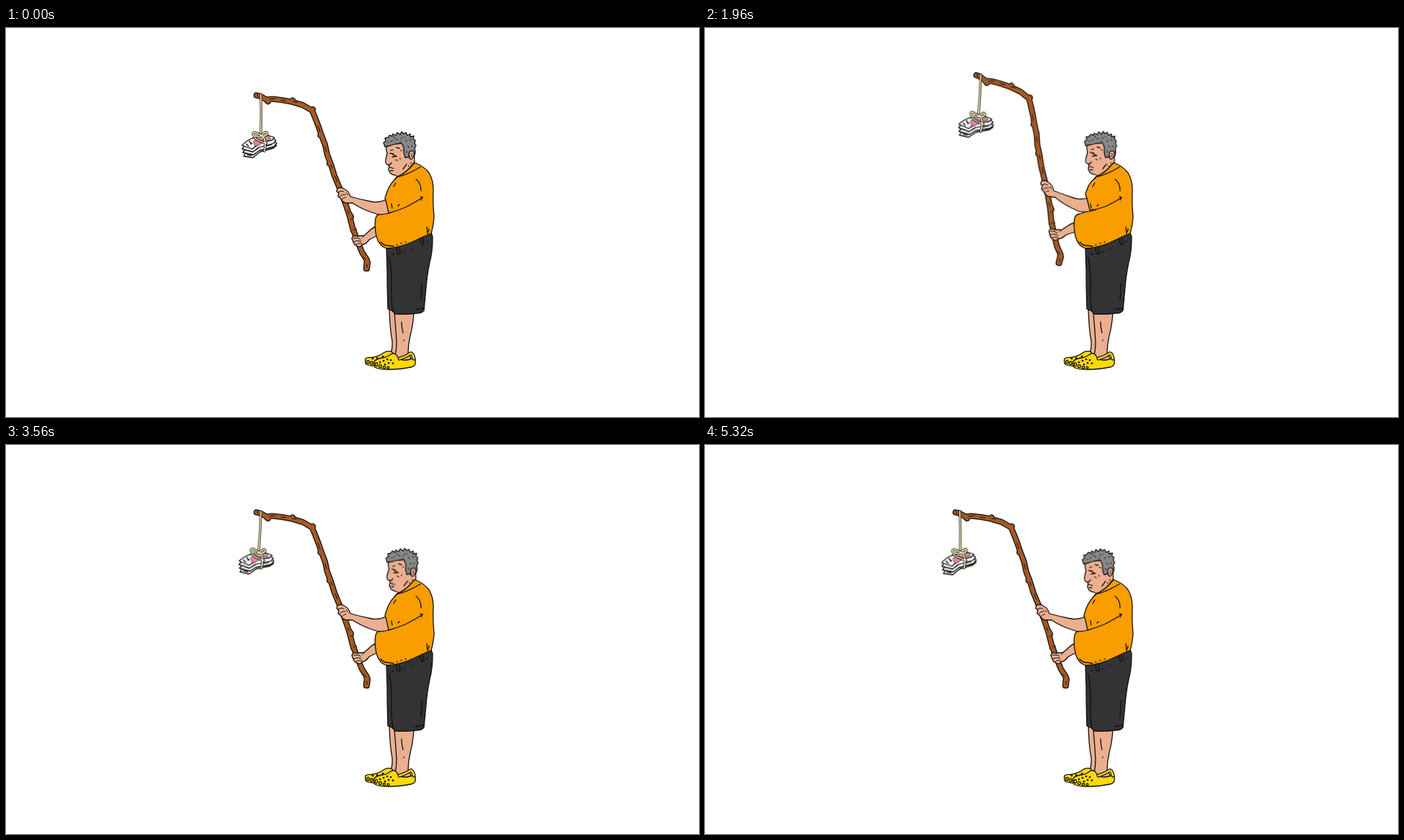
Animation, 960 px wide and 540 px high, one loop 5.48 s. Source, as an HTML page without scripts:

```html
<!DOCTYPE html>
<html lang="en">
<head>
<meta charset="utf-8">
<title>Money on a stick</title>
<style>
html, body { margin: 0; width: 100%; height: 100%; overflow: hidden; background: #fff; }
svg { display: block; width: 100vw; height: 100vh; }
path, ellipse { stroke: #111; stroke-width: 1.3; stroke-linecap: round; stroke-linejoin: round; }
.skin { fill: #ebaf90; }
.shirt { fill: #f99d00; }
.pants { fill: #333335; }
.shoe { fill: #fcd90c; }
.hair { fill: #868789; }
.note { fill: #f1f0f2; }
.pink { fill: #ee7f9f; stroke-width: .6; }
.line { fill: none; }
.fine { fill: none; stroke-width: 1; }
.bare { stroke: none; }
.holes { fill: none; stroke-width: 2.7; }
.bark { fill: none; stroke-width: 8.2; }
.wood { fill: none; stroke: #a65923; stroke-width: 5.6; }
.rope { fill: none; stroke-width: 3.3; }
.core { fill: none; stroke: #f2e8ae; stroke-width: 1.7; }
.strap { fill: none; stroke-width: 5; }
.band { fill: none; stroke: #fcd90c; stroke-width: 2.6; }

.lift, .level, .reach, .sleeve, .head, .swing, .twist { animation: 5480ms infinite ease-in-out; }
.lift { transform-origin: 545.6px 269.6px; animation-name: lift; }
.reach { transform-origin: 553px 282px; animation-name: reach; }
.level { transform-origin: 353px 92px; animation-name: level; }
.swing { transform-origin: 353px 92px; animation-name: swing; }
.twist { transform-origin: 353px 146px; animation-name: twist; }
.head { transform-origin: 560px 215px; animation-name: nod; }
.sleeve { animation-name: sleeve; }

@keyframes lift {
  0%, 56%, 100% { transform: rotate(0deg); }
  9.5%, 46.4% { transform: rotate(8.7deg); }
}
@keyframes level {
  0%, 56%, 100% { transform: rotate(0deg); }
  9.5%, 46.4% { transform: rotate(-8.7deg); }
}
@keyframes reach {
  0%, 56%, 100% { transform: rotate(0deg); }
  9.5%, 46.4% { transform: rotate(6.5deg); }
}
@keyframes sleeve {
  0%, 56%, 100% { d: path("M541 208Q532 216 528 227L525 236L528 247L530 257Q541 254 553 249Q569 241 577 235"); }
  9.5%, 46.4% { d: path("M541 208Q533 214 530 222L527 230L530 240L533 253Q543 252 554 248Q569 241 577 235"); }
}
@keyframes swing {
  0%, 100% { transform: rotate(0deg); }
  4.4% { transform: rotate(3deg); }
  12.4% { transform: rotate(-7deg); }
  19% { transform: rotate(7deg); }
  25.7% { transform: rotate(-6deg); }
  33.9% { transform: rotate(5deg); }
  40.2% { transform: rotate(-4deg); }
  45.3% { transform: rotate(2deg); }
  51.1% { transform: rotate(-5deg); }
  55.5% { transform: rotate(-6deg); }
  62% { transform: rotate(8deg); }
  68.6% { transform: rotate(-4deg); }
  75.2% { transform: rotate(4deg); }
  81.8% { transform: rotate(-2deg); }
  88.5% { transform: rotate(.8deg); }
  97% { transform: rotate(-.6deg); }
}
@keyframes twist {
  0%, 100% { transform: rotate(0deg); }
  4.4% { transform: rotate(4deg); }
  12.4% { transform: rotate(-14deg); }
  19% { transform: rotate(6deg); }
  25.7% { transform: rotate(-8deg); }
  33.9% { transform: rotate(3deg); }
  40.2% { transform: rotate(-4deg); }
  45.3% { transform: rotate(2deg); }
  55.5% { transform: rotate(-7deg); }
  62% { transform: rotate(4deg); }
  68.6% { transform: rotate(-3deg); }
  75.2% { transform: rotate(2deg); }
  81.8% { transform: rotate(-1deg); }
  97% { transform: rotate(-.5deg); }
}
@keyframes nod {
  0%, 25.5%, 56.9%, 100% { transform: rotate(0deg); }
  7.3% { transform: rotate(4.4deg); }
  12.4% { transform: rotate(2.7deg); }
  20% { transform: rotate(1.2deg); }
  35.8% { transform: rotate(2.7deg); }
  46.5% { transform: rotate(4.4deg); }
  65.7% { transform: rotate(3.5deg); }
  72.3% { transform: rotate(2.7deg); }
  78.5% { transform: rotate(3.3deg); }
  86% { transform: rotate(.8deg); }
  92% { transform: rotate(2.6deg); }
  97% { transform: rotate(-.4deg); }
}
</style>
</head>
<body>
<svg viewBox="0 0 960 540">
<defs>
  <path id="stick" d="M347 93.500L353 95L361 99.500L369 98.500L382 100L396 102.500L411 107L424 114.500L428 124L433 137L437 149L442 162L445 176L450 189L455 205L462 222L470 243L476 261L480 277L487 296L493 311L500 322L499 334M360 99L363 102M396 102L397 100.500M424 114L425 113M437 149L435.500 149M449 188L448 188M475 257L478 262M482 281L481 281M499 321L501 325L500 334" style="stroke:inherit;stroke-width:inherit"/>
  <path id="bow" d="M344 152Q349 157 361 160M356 150Q361 158 358 171M353 149Q343 142 342 147Q343 152 353 150Q360 142 362 146Q361 151 353 150" style="stroke:inherit;stroke-width:inherit"/>
</defs>

<!-- legs and clogs -->
<path class="skin" d="M531 390Q532 420 535 434Q536 445 532 454L541 457L543 395Z"/>
<path class="shoe" d="M498 459Q500 457 506 457.500Q516 456 523 451Q529 447 535 450L540 458L522 470Q507 470 499 467Q497 463 498 459Z"/>
<path class="skin" d="M538 395Q540 418 541 436Q541 447 539 454L546 463L561 463Q562 457 557 452Q557 440 560 427Q564 412 565 395Z"/>
<path class="line" d="M548 408Q548 416 550 423M551 433v1"/>
<path class="shoe" d="M510 463Q513 459 521 458Q528 457 533 453Q538 450 541 454Q544 461 552 461Q561 461 565 457Q568 460 567 466Q566 470 560 471Q546 474 530 474Q516 474 511 471Q509 467 510 463Z"/>
<path class="strap" d="M545 459Q553 457 561 451.500Q564 453 565 459"/>
<path class="band" d="M545 459Q553 457 561 451.500Q564 453 565 459"/>
<g class="line">
  <ellipse cx="501.500" cy="463.500" rx="1.7" ry="2.2"/><ellipse cx="506.500" cy="465" rx="1.7" ry="2.2"/>
  <ellipse cx="513" cy="467" rx="1.8" ry="2.3"/><ellipse cx="518.500" cy="469.500" rx="1.8" ry="2.1"/>
  <ellipse cx="524" cy="471" rx="1.7" ry="1.7"/><ellipse cx="529.500" cy="471.500" rx="1.4" ry="1.6"/>
</g>
<path class="holes" d="M508 459h.1M514 458h.1M522 456h.1M523 462h.1M528 460h.1M518 464h.1M530 465h.1M533 461h.1M536 465.500h.1M525 467h.1"/>

<!-- shorts -->
<path class="pants" d="M527 306Q548 304 566 295L589 284L591 290Q591 311 587 325Q583 345 582 360L579 392Q576 396 569 396Q555 398 539 397L536 393L529 390Q528 360 528 335Z"/>
<path class="line" d="M531 318Q535 340 534 365Q534 382 536 394M541 305L542 313L546 314L545 303M573 291L576 301L579 300L577 289M576 355L575 377M567 391L578 389M535 314h2M549 311l3 -1M561 307h1M582 297l2 -1"/>

<!-- stick, far arm and bait -->
<g class="lift">
  <use href="#stick" class="bark" stroke="#111"/>
  <use href="#stick" class="wood"/>
  <path class="fine" d="M348 91.500l1 4M365 99l8 -1M381 100l7 1M397 102l6 1M432 136l3 8M442 165l2 7M450 190l2 5M456 206l3 8M473 253l2 5M477 266l3 -2M484 279l-3 2M495 318l4 4M500 328l0 4"/>
  <path class="skin" d="M479 292Q481 287 486 289L496 288Q500 285 504 281Q509 276 517 274L526 280L518 287Q510 290 503 294Q498 301 493 301Q491 305 487 303L483 301L481 297Z"/>
  <path class="fine" d="M481 292Q486 290 491 293M481 297Q486 294 492 296M484 301Q488 298 493 299M494 291L497 287"/>
  <g class="level">
    <g class="swing">
      <path class="rope" d="M353 92Q354 119 353 146"/>
      <path class="core" d="M353 92Q354 119 353 146"/>
      <g class="twist">
        <path class="note" d="M329 178L333 172L366 160L375 163L370 167L352 172L342 180Z"/>
        <path class="note" d="M328 173L331 169L367 154L375 160L371 165L351 170L343 176Z"/>
        <path class="note" d="M327 168L330 164L365 150L374 156L371 160L350 166L342 172Z"/>
        <path class="note" d="M327 163Q332 157 341 153L363 149L372 152L368 156Q357 157 349 162L341 168Z"/>
        <path class="pink" d="M343 157L352 153L358 156L350 163L345 164ZM358 151L364 149.500L367 154L361 155Z"/>
        <path class="line" d="M333 161l3 3M337 157l3 4M339 161l2 -1M361 164l7 -2M334 176l6 1M364 167l5 -2M346 169l4 -3"/>
        <use href="#bow" class="rope" stroke="#111"/>
        <use href="#bow" class="core"/>
      </g>
    </g>
  </g>
</g>

<!-- neck and head -->
<path class="skin bare" d="M541 207L545 195L565 180L567 188L553 203Z"/>
<g class="head">
  <path class="skin" d="M527 163Q526 169 528 174L526 183Q525 190 530 190L531 193Q529 196 531 199Q532 203 538 204L544 206Q552 203 558 196L566 186L564 160L545 155Z"/>
  <path class="hair" d="M525 165L523 159L526 157L525 153L529 152L531 149L535 150L536 147L540 149L542 145L546 148L548 144L551 147L554 145L556 149L560 147L560 151L565 150L564 154L567 156L566 160L568 163L566 167L567 172L566 177L563 172L559 172L558 179L553 180L551 173L551 166L548 160L540 161L533 163L529 164Z"/>
  <path class="skin" d="M558 174Q560 169 564 171Q567 175 564 179Q562 184 559 181Z"/>
  <path class="fine" d="M561 174Q564 174 561 179M533 158l2 -2M540 154l2 1M547 154l2 -2M554 156l1 2M559 155l2 1M557 164l1 2M563 163l-1 2M537 151l1 2M551 151l1 1M529 158l1 1M555 171v2M546 158l1 -1"/>
  <path class="line" d="M532 174L537 175M535 179L541 178L536 176M533 170l3 -1M540 183l2 1M531 193L537 195M533 198L536 198M550 196L555 189M534 187Q533 190 530 190M546 181v1M541 166l4 1M547 170h1M561 187v1M558 191v1"/>
</g>

<!-- shirt -->
<path class="shirt" d="M541 207Q555 201 566 187Q578 191 586 201Q592 211 592 225Q591 241 593 262Q592 275 589 285Q577 290 565 296Q547 305 527 306Q517 303 513 289Q510 275 512 264Q513 259 519 258L535 253L535 215Z"/>
<path class="line" d="M541 207Q556 204 574 193M568 210Q575 215 575 226M583 276L584 286M586 279l-1 4M519 297Q523 302 529 302L537 303M541 301h1M547 299h1M553 297h1"/>

<!-- near arm -->
<g class="reach">
  <path class="skin" d="M459 223Q463 220 468 223Q475 226 477 234Q491 238 506 241Q517 243 527 238L540 236L538 254L530 257Q518 261 507 256Q492 251 480 243L471 243Q465 241 464 237L460 234L461 229L458 227Z"/>
  <path class="fine" d="M460 228Q464 225 468 227M462 234Q466 230 470 231M465 239Q467 235 471 235M471 229L474 232"/>
</g>
<path class="shirt sleeve" d="M541 208Q532 216 528 227L525 236L528 247L530 257Q541 254 553 249Q569 241 577 235"/>
<path class="line" d="M577 235L574 234M577 235L575 239M534 244l1 6M537 220l3 -5M543 247l2 -2"/>
</svg>
</body>
</html>
```
